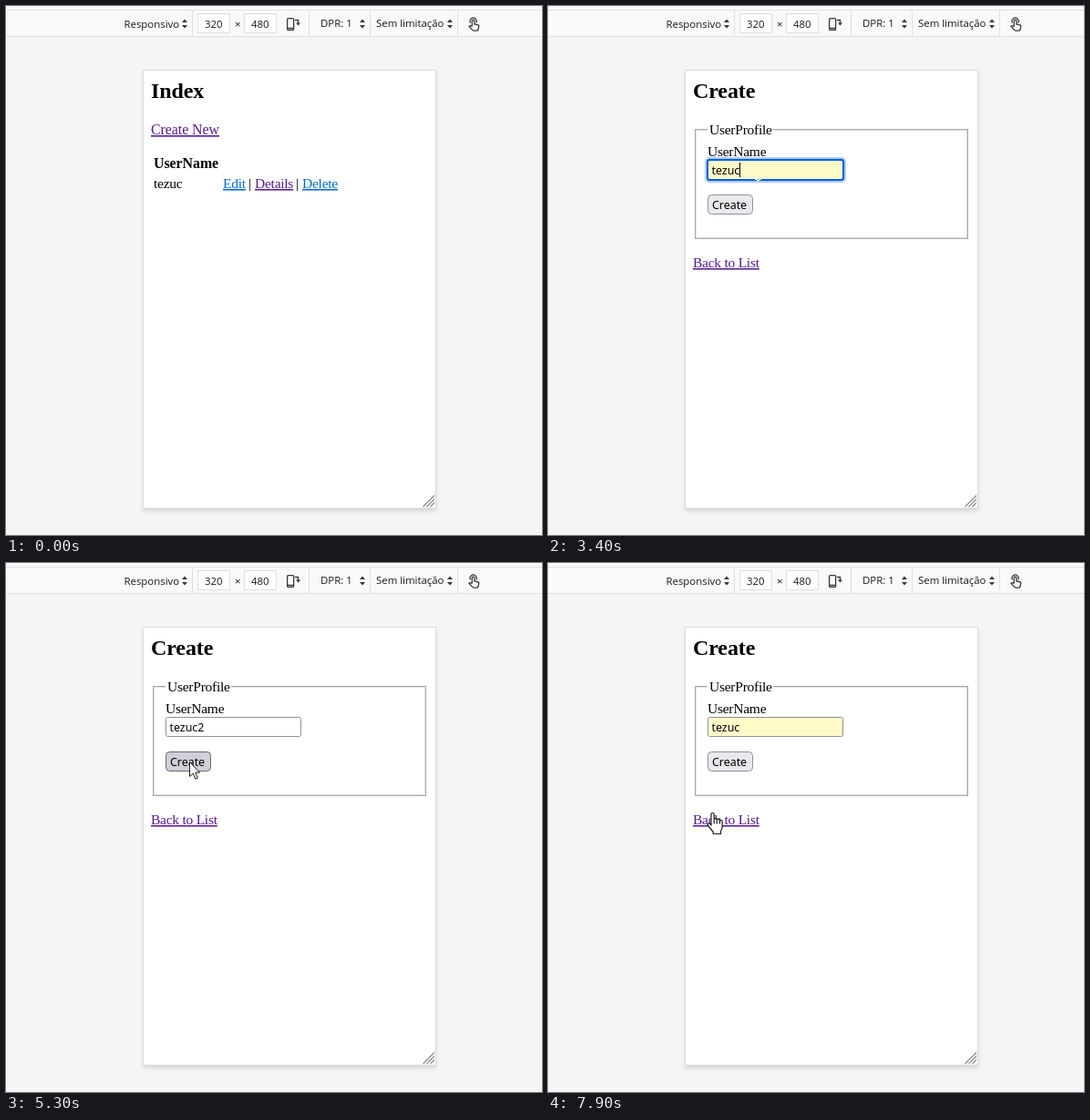
An HTML page for the animation above (8 s loop, 588 px wide and 581 px high).

```html
<!DOCTYPE html>
<html lang="pt">
<head>
<meta charset="utf-8">
<title>Form demo</title>
<style>
  html, body { margin: 0; width: 100%; height: 100%; overflow: hidden; background: #f5f5f5; }
  svg { display: block; }
  .page { font: 15.5px "Liberation Serif", serif; letter-spacing: -.25px; }
  .page .wide { font-size: 15.9px; letter-spacing: -.05px; }
  .page h2, .title { font-size: 24px; font-weight: bold; letter-spacing: -.1px; }
  .bold { font-weight: bold; }
  .ui { font: 11.4px "Open Sans", sans-serif; fill: #18181a; }
  .control { font: 12.4px "Noto Sans", sans-serif; letter-spacing: 0; }
  .link { fill: #0069c8; text-decoration: underline; }
  .visited { fill: #551a8b; }
  .active { fill: #e00000; }
</style>
</head>
<body>
<svg width="588" height="581" viewBox="0 0 588 581">
  <defs>
    <filter id="shadow" x="-5%" y="-5%" width="110%" height="110%">
      <feDropShadow dx="0" dy="3" stdDeviation="2" flood-color="#0c0c0d" flood-opacity=".12"/>
    </filter>
    <path id="spin" d="M-3 -1.5L0 -5L3 -1.5ZM-3 1.5L0 5L3 1.5Z" fill="#38383d"/>
    <g id="actions">
      <text class="link" x="238">Edit</text>
      <text x="266">|</text>
      <text class="link details" x="273">Details</text>
      <text x="318">|</text>
      <text class="link" x="325">Delete</text>
    </g>
  </defs>

  <!-- toolbar -->
  <rect width="588" height="581" fill="#f5f5f5"/>
  <rect width="588" height="33" fill="#f9f9fa"/>
  <path d="M0 4.5H588M0 33.5H588M204.5 5V33M332.5 5V33M399.5 5V33M495.5 5V33" stroke="#dfdfe1"/>
  <g fill="#fff" stroke="#dedee0">
    <rect x="210.5" y="8.5" width="35" height="21"/>
    <rect x="261.5" y="8.5" width="35" height="21"/>
  </g>
  <g class="ui">
    <text x="129.500" y="23.500">Responsivo</text>
    <text x="218" y="23.500">320</text>
    <text x="251" y="23.500">×</text>
    <text x="269" y="23.500">480</text>
    <text x="345" y="23">DPR: 1</text>
    <text x="406" y="23">Sem limitação</text>
  </g>
  <use href="#spin" x="196" y="19.500"/>
  <use href="#spin" x="391" y="19.500"/>
  <use href="#spin" x="487" y="19.500"/>
  <g fill="none" stroke="#38383d" stroke-width="1.3">
    <rect x="308.600" y="13.600" width="7" height="12.800" rx="1"/>
    <path d="M308 24.500H316M317 15.500H320.500V20"/>
    <path d="M318 18.500H323L320.500 21.500Z" fill="#38383d" stroke="none"/>
    <path d="M509.500 18.500a3.600 3.600 0 1 1 6.200 0" stroke-width="1.200"/>
    <path d="M511.300 22.500V16.500a1.300 1.300 0 0 1 2.600 0V20l4 .8q1 .3 .8 1.500l-.6 3.200q-.4 1.700-2 1.700h-2.700q-1 0-1.700-.8l-3.700-4q.8-1.500 3.300.1"/>
  </g>

  <!-- viewport -->
  <rect x="150.500" y="70.500" width="321" height="481" fill="#fff" stroke="#dcdcdc" filter="url(#shadow)"/>
  <path d="M457.500 550L470 537.500M461.500 550L470 541.500M465.500 550L470 545.500" stroke="#8a8a8a" stroke-width="1.100"/>

  <g class="page" id="index">
    <text class="title" x="159" y="101">Index</text>
    <text class="link visited wide" id="createNew" x="159" y="141">Create New</text>
    <text class="bold wide" x="162" y="178">UserName</text>
    <g transform="translate(0 200)">
      <text x="162">tezuc</text>
      <text class="link" x="238">Edit</text>
      <text x="266">|</text>
      <text class="link visited" x="273">Details</text>
      <text x="318">|</text>
      <text class="link" x="325">Delete</text>
    </g>
    <g id="newRow" transform="translate(0 222)">
      <text x="162">tezuc2</text>
      <use href="#actions"/>
    </g>
  </g>

  <g class="page" id="create">
    <text class="title" x="159" y="101">Create</text>
    <g fill="none">
      <rect x="162.500" y="136.500" width="297" height="118" stroke="#dedede"/>
      <rect x="161.500" y="135.500" width="299" height="120" stroke="#a9a9a9"/>
    </g>
    <rect x="175" y="134" width="72" height="5" fill="#fff"/>
    <text x="177" y="141">UserProfile</text>
    <text x="175" y="165">UserName</text>
    <rect id="field" x="175.500" y="169.500" width="148" height="21" rx="2" stroke="#8f8f9d"/>
    <g id="focus" fill="none" stroke-width="2">
      <rect x="173" y="167" width="153" height="26" rx="4" stroke="#0060df" stroke-opacity=".32"/>
      <rect x="175" y="169" width="149" height="22" rx="2" stroke="#0060df"/>
    </g>
    <path id="beam" d="M227 190.500H230M231 190.500H234M229 191.500H232" stroke="#fff"/>
    <text class="control" id="value" x="179.500" y="185"></text>
    <rect id="caret" y="172" width="1" height="16"/>
    <rect id="button" x="175.500" y="207.500" width="49" height="21" rx="4" stroke="#8f8f9d"/>
    <text class="control" x="180" y="223">Create</text>
    <g id="popup">
      <rect x="175.500" y="190.500" width="203" height="33" fill="#ededed" stroke="#a5a5a8"/>
      <text class="ui" style="font-size:11.1px;letter-spacing:0" x="205" y="213">Ver contas de acesso salvas</text>
    </g>
    <text class="link visited" x="159" y="287">Back to List</text>
  </g>

  <g id="cursor" fill="#fff" stroke="#1b1b1b" stroke-linejoin="round">
    <path id="arrow" d="M.5 .5V16.500L4.200 13.200L6.800 19.200L9.300 18.200L6.700 12.200H11.500Z"/>
    <path id="hand" stroke-width="1.200" d="M-2 14V2.200q0-1.700 1.600-1.700t1.600 1.700V8q0-1.300 1.500-1.300T4.300 8.200q.2-1 1.600-1T7.500 9q.2-.7 1.300-.7T10.200 10V15.500q0 2.500-1.700 5V23.500H.2V21.500L-5.300 14.700q-1-1.600.2-2.500t2 .3ZM1.200 8v4.500M4.300 8.500v4M7.500 9v3.500"/>
  </g>
</svg>

<script>
const LOOP = 8000, STEP = 100;
const el = id => document.getElementById(id);
const show = (id, on) => el(id).style.display = on ? '' : 'none';
const within = (t, from, to) => t >= from && t < to;

// time, hotspot x, hotspot y, shape, rest until the next entry
const REST = true;
const path = [
  [0, 25, 15, '', REST],
  [200, 25, 15, 'arrow'],
  [500, 172, 149, 'arrow'],
  [600, 187, 132, 'hand', REST],
  [1400, 187, 140, 'arrow'],
  [1600, 230, 180, '', REST],
  [3700, 212, 208, 'arrow'],
  [3800, 197, 213, 'arrow', REST],
  [4000, 212, 217, 'arrow'],
  [4300, 288, 235, 'arrow'],
  [4600, 281, 238, 'arrow', REST],
  [4800, 275, 238, 'arrow'],
  [5000, 214, 223, 'arrow', REST],
  [5200, 206, 221, 'arrow'],
  [5300, 201, 218, 'arrow', REST],
  [5600, 204, 225, 'arrow'],
  [5700, 207, 233, 'arrow', REST],
  [6000, 215, 240, 'arrow'],
  [6300, 300, 261, 'arrow'],
  [6500, 323, 233, 'arrow', REST],
  [6700, 326, 230, 'arrow'],
  [6900, 236, 162, 'arrow'],
  [7000, 210, 143, 'hand'],
  [7100, 198, 135, 'hand', REST],
  [7500, 196, 145, 'arrow'],
  [7700, 186, 210, 'arrow', REST],
  [7900, 181, 274, 'hand', REST]
];

function drawCursor(t) {
  const i = path.findLastIndex(p => p[0] <= t);
  const [t0, x0, y0, shape, rest] = path[i];
  const [t1, x1, y1] = path[i + 1] || path[i];
  const k = rest ? 0 : (t - t0) / (t1 - t0);
  const x = Math.round(x0 + (x1 - x0) * k), y = Math.round(y0 + (y1 - y0) * k);
  el('cursor').setAttribute('transform', `translate(${x} ${y})`);
  show('arrow', shape === 'arrow');
  show('hand', shape === 'hand');
}

function draw(t) {
  const creating = within(t, 1400, 5600) || t >= 7500;
  const focused = within(t, 2500, 4800);
  const filled = within(t, 1800, 3500) || t >= 7900;
  const typed = within(t, 3500, 5600);
  const caretOn = within(t, 2500, 2900) || within(t, 3400, 4000) || within(t, 4500, 4800);
  const hover = within(t, 5200, 5600), pressed = within(t, 5400, 5600);

  show('index', !creating);
  show('create', creating);
  show('newRow', t >= 5600);
  el('createNew').classList.toggle('active', within(t, 1200, 1400) || within(t, 7300, 7500));

  el('field').setAttribute('fill', filled ? '#fffbc8' : '#fff');
  el('value').textContent = typed ? 'tezuc2' : filled ? 'tezuc' : '';
  show('focus', focused);
  show('beam', within(t, 2500, 3700));
  show('caret', caretOn);
  el('caret').setAttribute('x', typed ? 217 : 210);
  show('popup', within(t, 3600, 4800));
  el('button').setAttribute('fill', pressed ? '#b1b1b9' : hover ? '#d0d0d7' : '#e9e9ed');
  el('button').setAttribute('stroke', hover ? '#676774' : '#8f8f9d');
  drawCursor(t);
}

const start = performance.now();
function tick() {
  const t = (performance.now() - start) % LOOP;
  draw(Math.floor(t / STEP) * STEP);
  requestAnimationFrame(tick);
}
tick();
</script>
</body>
</html>
```
